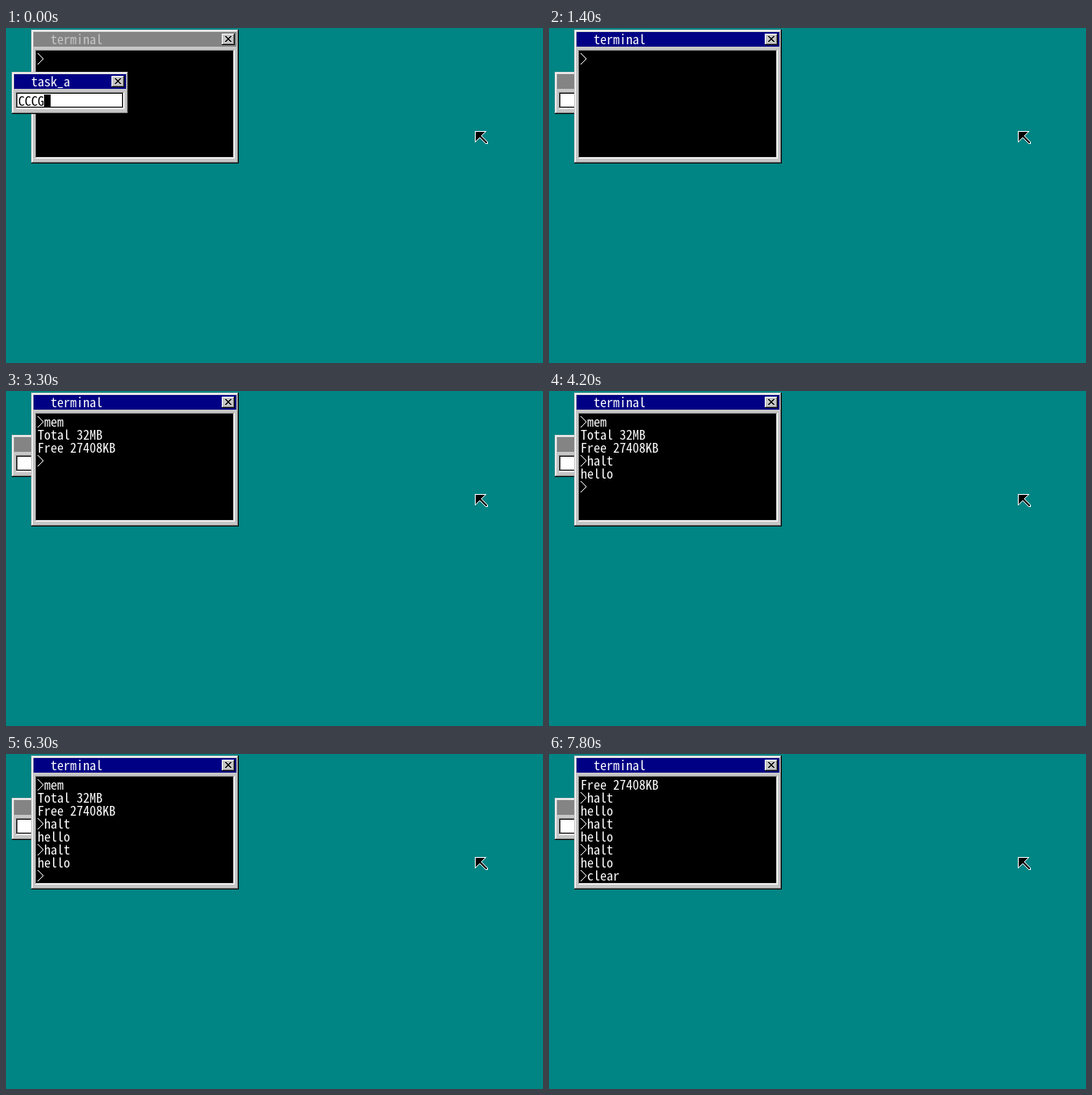
An HTML page with a canvas for the animation above (8 s loop, 662 by 413 pixels).

```html
<!DOCTYPE html>
<html lang="en">
<head>
<meta charset="utf-8">
<title>Terminal session</title>
<style>
  html, body { margin: 0; width: 100%; height: 100%; overflow: hidden; background: #008484; }
  canvas { display: block; }
</style>
</head>
<body>
<canvas id="stage" width="662" height="413"></canvas>
<script>
const ctx = document.getElementById('stage').getContext('2d');
const LOOP = 8000, CELL = 8, LINE = 16, ROWS = 8;
const TEAL = '#008484', NAVY = '#000084', GRAY = '#848484';
const SILVER = '#c6c6c6', WHITE = '#fff', BLACK = '#000';

// [time, text in the input box]
const inputStates = [[0, 'CCCG'], [700, 'CCC'], [1000, 'CC'], [1100, 'C'], [1300, '']];

// [time, text appended to the terminal]
const terminalLog = [
  [0, '>'],
  [2300, 'me'], [2400, 'm'], [2600, '\nTotal 32MB\nFree 27408KB\n>'],
  [3700, 'h'], [3800, 'a'], [3900, 'l'], [4000, 't'], [4200, '\nhello\n>'],
  [4700, 'h'], [4900, 'a'], [5000, 'l'], [5100, 't'], [5200, '\nhello\n>'],
  [6600, 'h'], [6800, 'a'], [6900, 'l'], [7000, 't'], [7100, '\nhello\n>'],
  [7300, 'c'], [7500, 'l'], [7600, 'e'], [7700, 'a'], [7800, 'r']
];

// The blinking cursor hides as soon as a key is typed.
const inputCursor = [[0, 200], [700, 1000]];
const terminalCursor = [[1800, 2300], [2800, 3300], [3800, 3900],
                        [4800, 4900], [5800, 6300], [6800, 6900]];
const FOCUS_SWITCH = 1400;

const isOn = (spans, t) => spans.some(([from, to]) => t >= from && t < to);

function rect(color, x, y, w, h) {
  ctx.fillStyle = color;
  ctx.fillRect(x, y, Math.max(0, w), h);
}

function text(string, x, y, color) {
  ctx.fillStyle = color;
  [...string].forEach((char, i) => {
    const left = x + i * CELL;
    if (char === '>') chevron(left, y, color);
    else ctx.fillText(char, left + CELL / 2, y + 14);
  });
}

function chevron(x, y, color) {
  for (let i = 0; i < 7; i++) {
    rect(color, x + i, y + 1 + i, 1, 1);
    rect(color, x + i, y + 14 - i, 1, 1);
  }
}

// Nested one-pixel bevel: top-left edge in one colour, bottom-right in another.
function bevel(x, y, w, h, light, dark) {
  rect(dark, x, y, w, h);
  rect(light, x, y, w - 1, h - 1);
}

function closeButton(x, y) {
  bevel(x, y, 16, 14, WHITE, BLACK);
  bevel(x + 1, y + 1, 14, 12, SILVER, GRAY);
  for (let i = 0; i < 7; i++) {
    rect(BLACK, x + 4 + i, y + 3 + i, 2, 1);
    rect(BLACK, x + 10 - i, y + 3 + i, 2, 1);
  }
}

function windowFrame(x, y, w, h, title, active, paper) {
  bevel(x, y, w, h, SILVER, BLACK);
  bevel(x + 1, y + 1, w - 2, h - 2, WHITE, GRAY);
  rect(SILVER, x + 2, y + 2, w - 4, h - 4);
  rect(active ? NAVY : GRAY, x + 3, y + 3, w - 6, 18);
  text(title, x + 24, y + 4, active ? WHITE : SILVER);
  closeButton(x + w - 21, y + 5);
  bevel(x + 5, y + 25, w - 10, h - 31, GRAY, WHITE);
  bevel(x + 6, y + 26, w - 12, h - 33, BLACK, SILVER);
  rect(paper, x + 7, y + 27, w - 15, h - 36);
}

function inputWindow(t, active) {
  windowFrame(7, 54, 144, 52, 'task_a', active, WHITE);
  const value = inputStates.filter(([time]) => time <= t).pop()[1];
  text(value, 15, 82, BLACK);
  if (isOn(inputCursor, t)) rect(BLACK, 15 + value.length * CELL, 82, CELL, LINE);
}

function terminalWindow(t, active) {
  windowFrame(31, 2, 256, 165, 'terminal', active, BLACK);
  const output = terminalLog.filter(([time]) => time <= t).map(entry => entry[1]).join('');
  const lines = output.split('\n').slice(-ROWS);
  lines.forEach((line, row) => text(line, 39, 30 + row * LINE, WHITE));
  if (isOn(terminalCursor, t)) {
    const row = lines.length - 1;
    rect(WHITE, 39 + lines[row].length * CELL, 30 + row * LINE, CELL, LINE);
  }
}

function pointer(x, y) {
  const span = (from, to, row) => {
    rect(WHITE, x + from, y + row, to - from + 1, 1);
    if (row > 0 && row < 15) rect(BLACK, x + from + 1, y + row, to - from - 1, 1);
  };
  for (let row = 0; row < 16; row++) {
    const right = row < 6 ? 13 - row : Math.min(row + 2, 15);
    if (row < 8) span(0, right, row);
    else {
      span(0, 13 - row, row);
      span(row - 2, right, row);
    }
  }
}

function draw(t) {
  ctx.font = '16px "Noto Sans Mono CJK JP", "Noto Sans Mono CJK SC", "Noto Sans CJK JP", "Liberation Mono", monospace';
  ctx.textAlign = 'center';
  rect(TEAL, 0, 0, 662, 413);
  if (t < FOCUS_SWITCH) {
    terminalWindow(t, false);
    inputWindow(t, true);
  } else {
    inputWindow(t, false);
    terminalWindow(t, true);
  }
  pointer(578, 127);
}

const start = performance.now();
function tick() {
  draw((performance.now() - start) % LOOP);
  requestAnimationFrame(tick);
}
tick();
</script>
</body>
</html>
```
